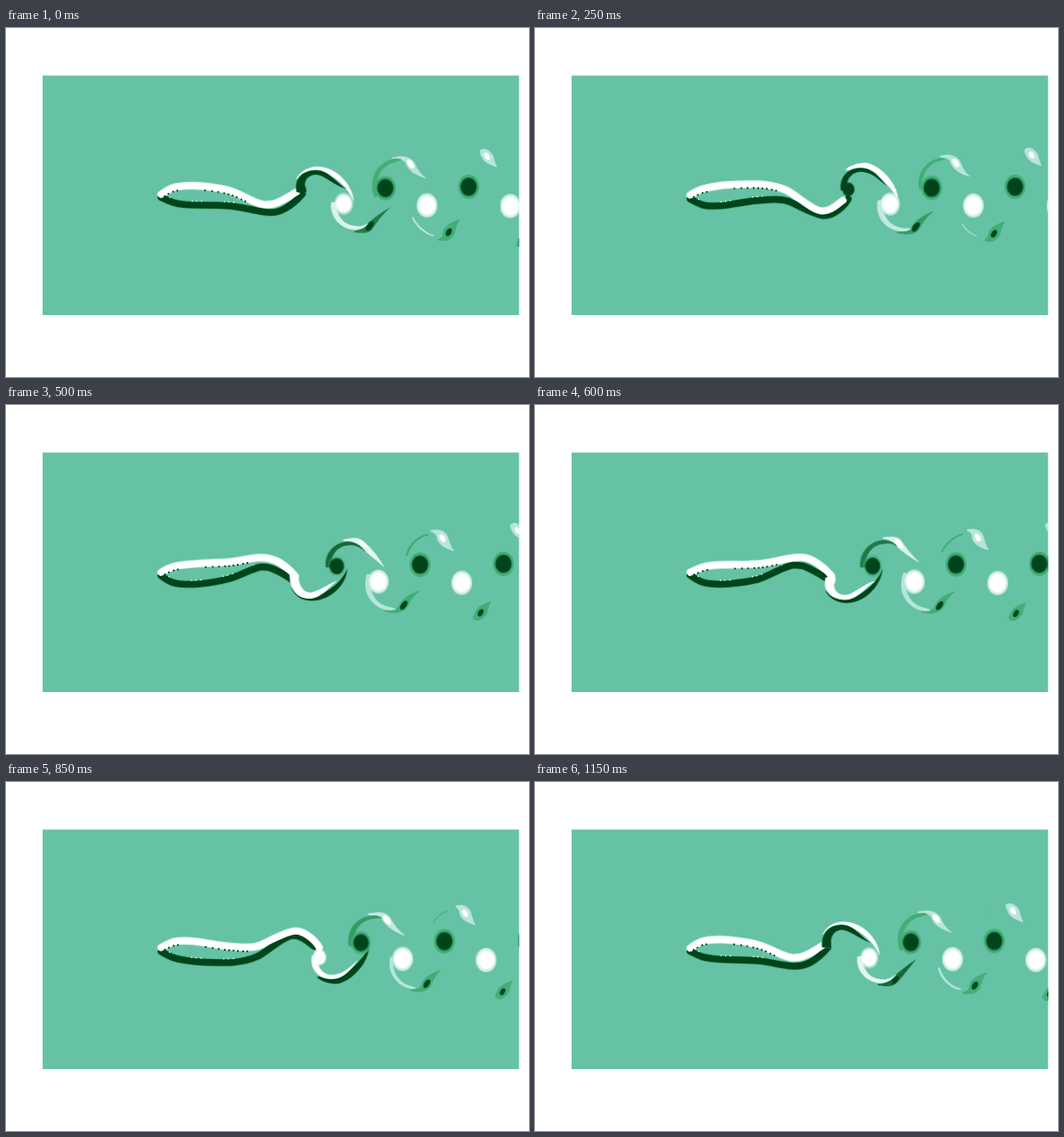
These frames come from a looping animation (600x400 px, 1.2 s). An HTML page without scripts:

```html
<!DOCTYPE html>
<html lang="en">
<head>
<meta charset="utf-8">
<title>Swimmer wake</title>
<style>
html, body { margin: 0; width: 100%; height: 100%; overflow: hidden; background: #fff; }
svg { display: block; width: 100%; height: 100%; }

/* a: own sheet, b: sheet of the opposite sign, *2: their soft edges */
.dark { --a: #00441b; --a2: #41ae76; --b: #fff; --b2: #b8e5da; }
.light { --a: #fff; --a2: #b8e5da; --b: #00441b; --b2: #41ae76; }

.edge, .band, .dots, .eddy, .arm, .drop, .seed, .core, .halo {
  animation: var(--n) var(--t, 4.8s) steps(6) calc(var(--d, 0s) - 5ms) infinite;
}
.edge, .band, .dots {
  --n: band; --t: 1.2s;
  animation-timing-function: steps(3);
  fill: none; stroke-linecap: round; stroke-linejoin: round;
}
.edge { stroke: var(--a2); stroke-width: 9.4; }
.band { stroke: var(--a); stroke-width: 7.6; }
.dots { stroke: var(--b); stroke-width: 2.2; stroke-dasharray: 0 5 0 5 0 6 0 5 0 32 0 8 0 7 0 7 0 5; }
.dark .dots { stroke-width: 1.6; stroke-dasharray: 0 5 0 6 0 26; }

.eddy { --n: drift; animation-timing-function: steps(96); }
.arm { --n: arm; stroke: var(--a2); stroke-width: 1; paint-order: stroke; }
.drop { --n: drop; stroke: var(--b2); stroke-width: 1; paint-order: stroke; }
.seed { --n: seed; fill: var(--b); }
.core { --n: core; fill: var(--a); }
.halo { --n: halo; fill: var(--a2); }
.soft { opacity: .55; }

@keyframes drift {
  from { transform: translate(315.7px, 184px); }
  to { transform: translate(698.1px, 184px); }
}
@keyframes core {
  0% { transform: translate(0, 1px) scale(0); }
  6.25% { transform: translate(0, 1px) scale(.5); }
  12.5% { transform: translate(0, 1px) scale(.8); }
  18.75% { transform: translate(0, .5px) scale(.93); }
  31.25% { transform: translate(0, -.5px) scale(1); }
  56.25%, 100% { transform: translate(0, -2px) scale(1); }
}
@keyframes halo {
  0%, 12.5% { opacity: 0; }
  25%, 100% { opacity: 1; }
}
@keyframes seed {
  0%, 12.5% { transform: translate(30px, -25px) rotate(-38deg) scale(0); }
  18.75% { transform: translate(30px, -25px) rotate(-38deg) scale(1.1, 1.3); }
  31.25% { transform: translate(29px, -28px) rotate(-36deg) scale(1, 1.2); }
  43.75% { transform: translate(25px, -32px) rotate(-32deg); }
  56.25% { transform: translate(21px, -37px) rotate(-32deg) scale(.9); }
  68.75%, 100% { transform: translate(15px, -41px) rotate(-32deg) scale(.8); }
}
@keyframes arm {
  0% { fill: var(--a); animation-timing-function: steps(3); d: path("M-10 6C0 0 8-14 16-14C28-13 34-6 43 4C34 2 24-6 16-6C8-5-2 6-8 12Z"); }
  3.125% { animation-timing-function: steps(3); d: path("M-6 8C-4-4 0-19 17-19C30-18 36-8 46 0C36-5 27-11 17-12C8-11 6 0 2 10Z"); }
  6.25% { d: path("M-6 4C-9-8-4-20 16-21C30-21 38-8 50 0C36-4 28-14 17-16C6-16 0-8 5 4Z"); }
  12.5% { fill: var(--a); d: path("M-9 2C-11-10-4-24 14-24C26-24 34-16 42-4C32-14 26-20 14-20C3-20-5-10-2 2Z"); }
  18.75% { d: path("M-14 2C-16-14-4-28 12-29C18-29 24-27 28-22C22-26 18-26 13-25C0-24-9-14-8 2Z"); }
  25% { fill: var(--a2); d: path("M-14 4C-17-14-6-30 14-31C18-31 20-31 23-29C20-29 17-28 14-28C0-26-11-14-9 6Z"); }
  31.25% { d: path("M-12 10C-20-10-10-31 12-34C14-34 16-34 18-33C16-32 14-32 12-31C-4-28-14-12-9 8Z"); }
  43.75% { opacity: 1; d: path("M-17-15C-14-24-4-33 6-36C7-36 7-36 8-36C7-35 6-35 5-35C-4-31-12-23-16-15Z"); }
  56.25%, 100% { opacity: 0; fill: var(--a2); d: path("M-5-36C-5-36-5-36-5-36C-5-36-5-36-5-36C-5-36-5-36-5-36C-5-36-5-36-5-36Z"); }
}
@keyframes drop {
  0% { fill: var(--b); animation-timing-function: steps(3); d: path("M-12-2C0-12 12-18 21-18C34-18 42-8 50 6C40-2 32-10 21-10C12-10 2-2-10 4Z"); }
  3.125% { animation-timing-function: steps(3); d: path("M-3-6C0-16 8-21 19-21C40-22 60-4 60 14C56 2 36-15 19-17C10-16 4-10 0-4Z"); }
  6.25% { d: path("M-6-12C-1-20 8-25 18-25C42-24 58-2 59 14C54 0 36-18 18-20C8-20 0-16-5-10Z"); }
  12.5% { fill: var(--b); d: path("M-2-24C4-28 12-30 20-30C36-28 57-4 56 12C51 0 34-14 24-22C14-26 6-25 0-23Z"); }
  18.75% { d: path("M12-32C20-33 28-34 32-29C37-22 43-13 53-4C41-11 33-17 28-22C24-27 20-30 12-31Z"); }
  25% { fill: var(--b2); d: path("M7-33C18-35 27-36 33-29C37-21 42-14 49-9C38-13 30-18 26-24C23-31 16-32 8-32Z"); }
  31.25% { d: path("M8-35C18-38 27-37 33-30C36-22 40-17 46-12C35-16 27-20 24-28C22-34 16-34 9-34Z"); }
  43.75% { d: path("M13-41C22-43 29-40 31-34C33-27 34-22 37-18C28-21 21-24 19-31C19-37 16-39 13-40Z"); }
  56.25% { d: path("M13-43C18-48 25-43 28-37C29-32 30-29 32-25C26-27 18-30 16-35C13-40 13-42 13-43Z"); }
  68.75%, 100% { fill: var(--b2); d: path("M7-47C12-52 19-47 22-41C23-36 24-33 26-29C20-31 12-34 10-39C7-44 7-46 7-47Z"); }
}
/* the band sheds its tail to an eddy at 25% and 75% */
@keyframes band {
  0%, 100% { d: path("M178 191S186 185 192 183S212 180 222 181S244 183 255 186S275 195 285 199S297 203 305 202S330 190 335 187"); }
  12.5% { d: path("M178 191S186 186 192 184S212 180 222 179S247 179 258 180S275 183 285 187S313 205 323 206S340 199 347 195"); }
  24.99% { d: path("M178 192S186 187 192 185S215 180 225 180S251 178 262 179S281 181 291 186S321 212 332 212S350 204 357 199"); }
  25% { d: path("M178 192S186 187 192 185S212 180 222 180S240 178 250 179S271 180 280 182S291 186 297 190S307 197 312 200"); }
  37.5% { d: path("M178 192S186 187 192 185S212 182 222 181S244 180 255 179S277 175 287 175S303 177 310 181S324 192 328 197"); }
  50% { d: path("M178 192S186 188 192 186S212 183 222 183S247 183 258 182S288 176 298 175S313 175 320 179S335 190 340 196"); }
  62.5% { d: path("M178 190S186 186 192 184S212 183 222 184S247 188 258 188S280 187 290 183S311 173 322 173S349 186 354 194"); }
  74.99% { d: path("M178 190S186 185 192 183S212 181 222 183S249 188 260 189S280 193 290 190S326 170 337 170S358 180 362 188"); }
  75% { d: path("M178 190S186 185 192 183S212 181 222 183S244 186 255 188S267 191 275 192S290 191 297 188S308 182 314 179"); }
  87.5% { d: path("M178 190S186 184 192 182S212 180 222 181S244 184 255 187S271 193 280 196S289 200 297 199S320 189 325 185"); }
}
</style>
</head>
<body>
<svg viewBox="0 0 600 400">
  <defs>
    <clipPath id="panel"><path d="M42 54.4H588.6V329H42Z"/></clipPath>
    <clipPath id="belly"><path d="M178 170H284V220H178Z"/></clipPath>
  </defs>
  <path fill="#66c2a4" d="M42 54.4H588.6V329H42Z"/>
  <g clip-path="url(#panel)">
    <g class="dark" style="--d:-.6s" transform="matrix(1 0 0 -1 0 386)"><path class="edge"/></g>
    <g class="light"><path class="edge"/></g>
    <g class="dark" style="--d:-.6s" transform="matrix(1 0 0 -1 0 386)">
      <path class="band"/>
      <g clip-path="url(#belly)"><path class="dots" transform="translate(0 4.5)"/></g>
    </g>
    <g class="light">
      <path class="band"/>
      <g clip-path="url(#belly)"><path class="dots" transform="translate(0 4.5)"/></g>
    </g>

    <g class="light" transform="matrix(1 0 0 -1 0 386)">
      <g class="eddy" style="--d:-.9s"><path class="drop"/><ellipse class="seed" rx="3" ry="5"/><path class="arm"/><g class="core"><ellipse class="halo" rx="12" ry="14"/><ellipse class="soft" rx="11" ry="12.5"/><ellipse rx="9.2" ry="10.4"/></g></g>
      <g class="eddy" style="--d:-2.1s"><path class="drop"/><ellipse class="seed" rx="3" ry="5"/><path class="arm"/><g class="core"><ellipse class="halo" rx="12" ry="14"/><ellipse class="soft" rx="11" ry="12.5"/><ellipse rx="9.2" ry="10.4"/></g></g>
      <g class="eddy" style="--d:-3.3s"><path class="drop"/><ellipse class="seed" rx="3" ry="5"/><path class="arm"/><g class="core"><ellipse class="halo" rx="12" ry="14"/><ellipse class="soft" rx="11" ry="12.5"/><ellipse rx="9.2" ry="10.4"/></g></g>
      <g class="eddy" style="--d:-4.5s"><path class="drop"/><ellipse class="seed" rx="3" ry="5"/><path class="arm"/><g class="core"><ellipse class="halo" rx="12" ry="14"/><ellipse class="soft" rx="11" ry="12.5"/><ellipse rx="9.2" ry="10.4"/></g></g>
    </g>
    <g class="dark">
      <g class="eddy" style="--d:-.3s"><path class="drop"/><ellipse class="seed" rx="3" ry="5"/><path class="arm"/><g class="core"><ellipse class="halo" rx="12" ry="14"/><ellipse class="soft" rx="9.8" ry="11"/><ellipse rx="8.8" ry="9.8"/></g></g>
      <g class="eddy" style="--d:-1.5s"><path class="drop"/><ellipse class="seed" rx="3" ry="5"/><path class="arm"/><g class="core"><ellipse class="halo" rx="12" ry="14"/><ellipse class="soft" rx="9.8" ry="11"/><ellipse rx="8.8" ry="9.8"/></g></g>
      <g class="eddy" style="--d:-2.7s"><path class="drop"/><ellipse class="seed" rx="3" ry="5"/><path class="arm"/><g class="core"><ellipse class="halo" rx="12" ry="14"/><ellipse class="soft" rx="9.8" ry="11"/><ellipse rx="8.8" ry="9.8"/></g></g>
      <g class="eddy" style="--d:-3.9s"><path class="drop"/><ellipse class="seed" rx="3" ry="5"/><path class="arm"/><g class="core"><ellipse class="halo" rx="12" ry="14"/><ellipse class="soft" rx="9.8" ry="11"/><ellipse rx="8.8" ry="9.8"/></g></g>
    </g>
  </g>
</svg>
</body>
</html>
```
